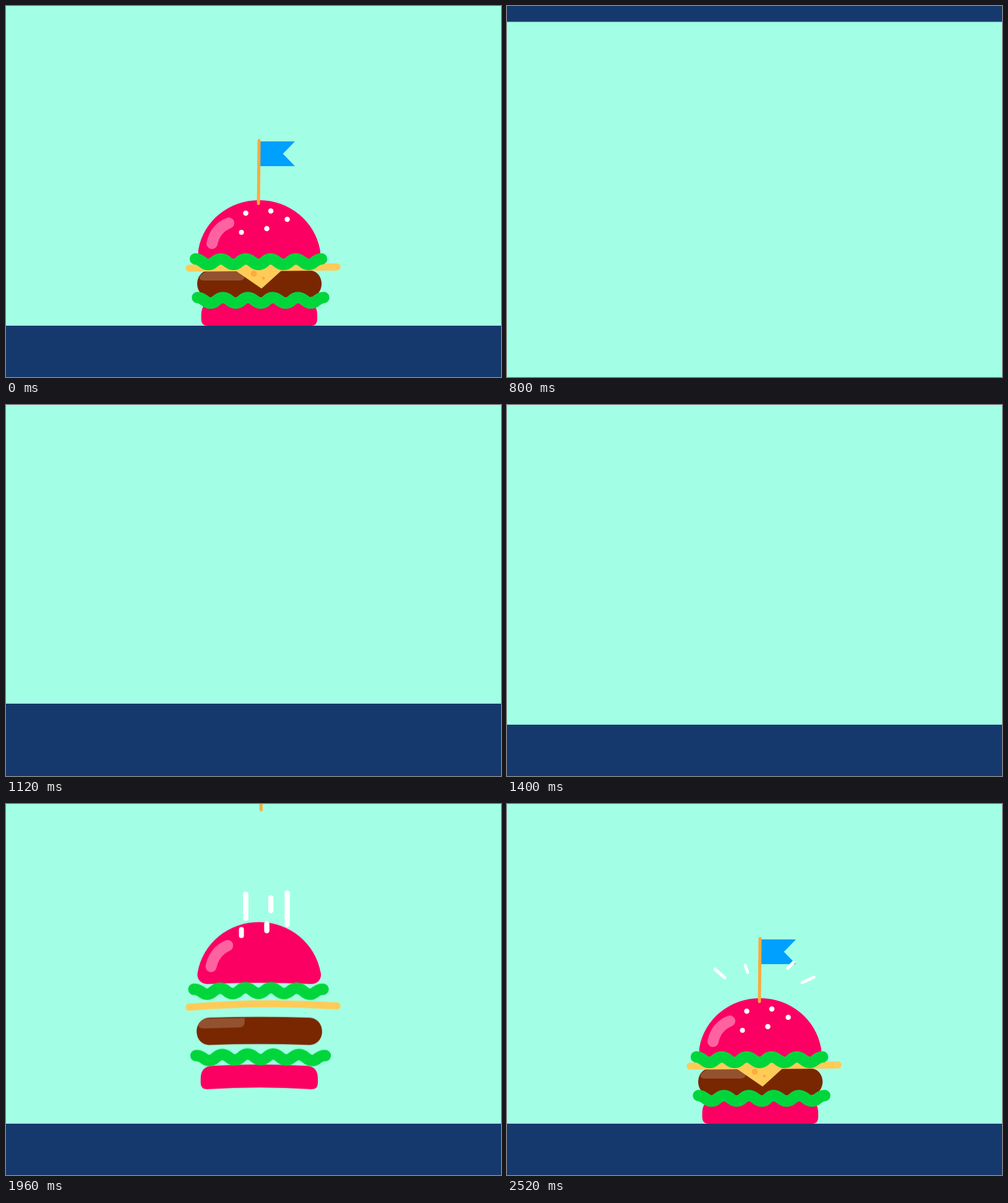
An HTML page without scripts for the animation above (2.56 s loop, 800x600 px).

```html
<!DOCTYPE html>
<html lang="en">
<head>
<meta charset="utf-8">
<title>Burger</title>
<style>
html, body { margin: 0; width: 100%; height: 100%; overflow: hidden; background: #a2ffe5; }
svg { display: block; width: 800px; height: 600px; }
path { fill: none; stroke-linecap: round; stroke-linejoin: round; }

.pan, .jump, .fall, .bend, .tilt, .streak, .flap, .flag, .spark {
  animation: 2560ms linear infinite;
}
.pan { animation-name: pan; }
.jump { animation-name: jump; }
.fall { animation-name: fall; }
.bend { animation-name: bend; d: var(--flat); }
.tilt { animation-name: tilt; transform-origin: 409px 500px; }
.streak { animation-name: streak; stroke: #fff; stroke-width: 8.5; stroke-dasharray: .01 99; }
.flap { animation-name: flap; transform-origin: 409px 428px; }
.flag { animation-name: flag; transform-origin: 409px 218px; }
.spark { animation-name: spark; transform-origin: 409px 325px; stroke: #fff; stroke-width: 5; }
.spark path { vector-effect: non-scaling-stroke; }

/* the camera moves up to the next floor */
@keyframes pan {
  0%, 15.6% { transform: translateY(0); }
  15.625% { transform: translateY(8px); animation-timing-function: cubic-bezier(.4, .112, .7, .268); }
  31.25% { transform: translateY(507px); }
  35.9375% { transform: translateY(875px); animation-timing-function: cubic-bezier(.25, .53, .6, .9); }
  43.75% { transform: translateY(1166px); animation-timing-function: cubic-bezier(.2, .58, .5, 1); }
  54.6875%, 100% { transform: translateY(1200px); }
}
@keyframes jump {
  0%, 57.8% { transform: translateY(0); }
  57.81%, 100% { transform: translateY(-1200px); }
}
/* --a and --b: height above rest, early and late in the fall */
@keyframes fall {
  0%, 57.8% { transform: translateY(0); }
  57.81% { transform: translateY(calc(var(--a) * -4.1px)); animation-timing-function: cubic-bezier(.3, .6, .6, .95); }
  64.0625% { transform: translateY(calc(var(--a) * -1px)); animation-timing-function: cubic-bezier(.4, .25, .7, .6); }
  76.5625% { transform: translateY(calc(var(--b) * -1px)); animation-timing-function: cubic-bezier(.4, .34, .7, .64); }
  82.8125%, 100% { transform: translateY(0); }
}
@keyframes bend {
  0%, 57.8% { d: var(--flat); }
  57.81% { d: var(--bent); }
  64.0625% { d: var(--bent); animation-timing-function: cubic-bezier(.45, .4, .75, .745); }
  82.8125%, 100% { d: var(--flat); }
}
@keyframes tilt {
  0%, 57.8% { transform: rotate(0); }
  57.81%, 64.0625% { transform: rotate(4deg); }
  76.5625%, 100% { transform: rotate(0); }
}
@keyframes streak {
  0%, 57.8% { stroke-dasharray: .01 99; }
  57.81%, 64.0625% { stroke-dasharray: calc(var(--l) * .35) 99; }
  76.5625% { stroke-dasharray: var(--l) 99; }
  82.8125%, 100% { stroke-dasharray: .01 99; }
}
@keyframes flap {
  0%, 57.8% { transform: scaleY(1); }
  57.81%, 82.03% { transform: scaleY(0); animation-timing-function: ease-out; }
  86%, 100% { transform: scaleY(1); }
}
@keyframes flag {
  0%, 57.8% { transform: translateY(0); }
  57.81%, 75% { transform: translateY(-340px) rotate(-2.5deg); }
  76.5625% { transform: translateY(-311.5px) rotate(-2.5deg); }
  85.9375%, 100% { transform: translateY(0); }
}
@keyframes spark {
  0%, 87.49% { transform: scale(.4); opacity: 0; }
  87.5% { transform: scale(.4); opacity: 1; animation-timing-function: cubic-bezier(.2, .6, .5, 1); }
  98.4375%, 100% { transform: scale(1); opacity: 1; }
}

.base {
  fill: #fb0062;
  --flat: path("M315.500 500C315.500 486 322 479 336 479Q409 479 483 479C497 479 503 486 503 500L503 507Q503 517 493 517Q409 517 326 517Q315.500 517 315.500 507Z");
  --bent: path("M313 500C313 486 320 479 334 479Q409 468 485 479C499 479 506 486 506 500L506 507Q506 517 495 517Q409 501 324 517Q313 517 313 507Z");
}
.meat {
  fill: #792700;
  --flat: path("M330 427.500Q409 427.500 489 427.500C517 427.500 517 471 489 471Q409 471 330 471C302 471 302 427.500 330 427.500Z");
  --bent: path("M329 432Q409 424 490 432C520 434 520 477.500 490 477.500Q409 469 329 477.500C299 477.500 299 434 329 432Z");
}
.shine {
  fill: #93522f;
  --flat: path("M313 438C316 432 322 429.500 330 429.500L386 429.500L386 436Q386 444 377 444L321 444Q311 444 313 438Z");
  --bent: path("M308 442C312 434 320 433 329 432.500L385 429.500L385 438Q384 446 376 446.500L319 451Q307 451 308 442Z");
}
.cheese {
  stroke: #ffcb58; stroke-width: 11.5;
  --flat: path("M296 424Q415 423 535 422");
  --bent: path("M296 424Q415 397 535 422");
}
.leaf {
  stroke: #00d63b; stroke-width: 18.5;
  --flat: path("M306 409Q311 409 317 413.500Q327 422.500 337 413.500T357.500 413.500T377.500 413.500T398 413.500T418 413.500T438 413.500T458.500 413.500T479 413.500T499 413.500Q505 409 510 409");
  --bent: path("M299 409Q305 408 311 411Q321.700 420 332.500 409.500T354 408T375.500 407T397 406.500T419 406.500T440 407T462 408T484 409.500T505 411Q511 408 517 409");
}
.bun {
  fill: #fb0062;
  --flat: path("M311 394C319 348 360 314 409 314C458 314 499 348 507.500 394C509.500 404 503 412.500 492 412.500Q409 412.500 327 412.500C316 412.500 309 404 311 394Z");
  --bent: path("M307 400C315 349 358 313.500 409 313.500C460 313.500 503 349 511 400C512.500 410 504 417 494 417Q409 405 325 417C314 417 305.500 410 307 400Z");
}
.gloss {
  stroke: #ff62a0; stroke-width: 18;
  --flat: path("M333 384Q338 360 360 351");
  --bent: path("M328.500 389Q334 364 355 353");
}
</style>
</head>
<body>
<svg viewBox="0 0 800 600">
  <rect width="800" height="600" fill="#a2ffe5"/>
  <g class="pan">
    <path d="M0 517H800V713H0ZM0-683H800V-484.500H0Z" style="fill:#16396d"/>
    <g class="jump">
      <g class="fall" style="--a:127;--b:56"><g class="tilt"><path class="bend base"/></g></g>
      <g class="fall" style="--a:178;--b:84">
        <path class="bend meat"/>
        <path class="bend shine"/>
      </g>
      <g class="fall" style="--a:140;--b:65">
        <g transform="translate(3.5 62.5)"><path class="bend leaf"/></g>
      </g>
      <g class="fall" style="--a:198;--b:96">
        <path class="bend cheese"/>
        <g class="flap">
          <path d="M371 428H445L413 457Z" style="fill:#ffcb58"/>
          <g fill="#ffac3b"><circle cx="400.500" cy="433" r="5"/><circle cx="416" cy="440" r="2.500"/></g>
        </g>
      </g>
      <g class="fall" style="--a:260;--b:123.5">
        <path class="bend bun"/>
        <path class="bend gloss"/>
      </g>
      <g class="fall" style="--a:230;--b:110"><path class="bend leaf"/></g>
      <g class="fall" style="--a:301;--b:151;--l:39px"><path class="streak" d="M387.500 335v-70"/></g>
      <g class="fall" style="--a:318;--b:154;--l:10px"><path class="streak" d="M380.500 366v-70" style="stroke-width:8"/></g>
      <g class="fall" style="--a:321;--b:160;--l:21px"><path class="streak" d="M428 331.500v-70"/></g>
      <g class="fall" style="--a:326;--b:156;--l:11px"><path class="streak" d="M421.500 360v-70"/></g>
      <g class="fall" style="--a:297;--b:151;--l:51px"><path class="streak" d="M454.500 345v-70"/></g>
      <g class="flag">
        <path d="M409 219.500H466L447 239L466 258.500H409Z" style="fill:#00a0ff;stroke:#00a0ff"/>
        <path d="M409 217.500L408 319.500" stroke="#fbaa3a" stroke-width="5"/>
      </g>
      <g class="spark">
        <path d="M336 267L352 281M385 261L389 272.500M463 256L454 265.500M477 289L496 280"/>
      </g>
    </g>
  </g>
</svg>
</body>
</html>
```
